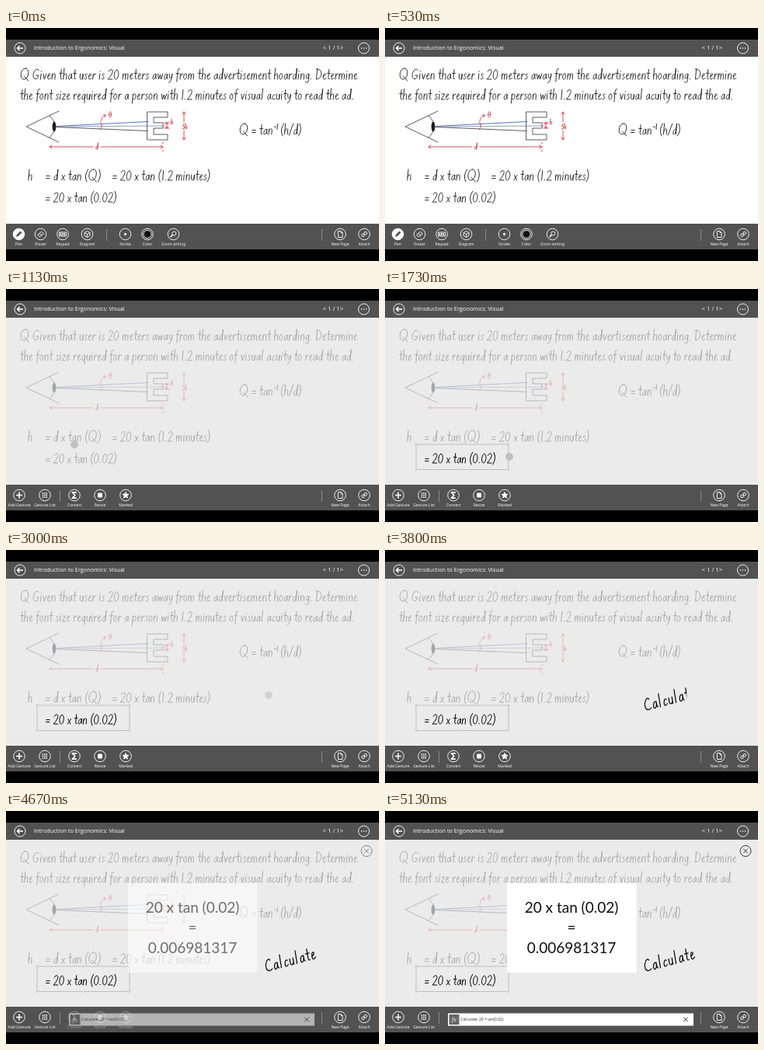
These frames come from a looping animation (480 px wide and 300 px high, 5.27 s). An HTML page:

```html
<!DOCTYPE html>
<html lang="en">
<head>
<meta charset="utf-8">
<title>Ergonomics note</title>
<style>
html, body { margin: 0; width: 100%; height: 100%; overflow: hidden; background: #000; }
svg { display: block; width: 480px; height: 300px; }
text { font-family: "Open Sans", "Noto Sans", sans-serif; fill: #fff; }
path, circle, rect { fill: none; }

.ink path { stroke: #1a1a1a; stroke-width: .9; stroke-linecap: round; stroke-linejoin: round; vector-effect: non-scaling-stroke; }
.ink .red path { stroke: #d8232a; stroke-width: .8; }
.ink .thin { stroke: #333; stroke-width: .8; }
.ink .pupil { fill: #1c1c28; }
.bold path { stroke: #000; stroke-width: 1; }
.calc path { stroke-width: 1.2; }

.ui path, .ui circle { stroke: #fff; stroke-width: .9; stroke-linejoin: round; }
.ui .solid { fill: #fff; }
.ui .dark { fill: #525252; stroke: none; }
.ui .black { fill: #111; }
.ui .thick { stroke-width: 1.6; }
.ui .dots { stroke-width: 1.5; stroke-dasharray: 1.5 .9; }
.ui .line { stroke: #999; stroke-width: .8; }
.ui text { font-size: 5px; text-anchor: middle; }
.head text { font-size: 7.3px; text-anchor: start; }
.close path, .close circle { stroke: #333; stroke-width: 1; }
.panel text { font: 19px Lato, "Open Sans", sans-serif; fill: #111; text-anchor: middle; }

/* every track shares the 5270 ms loop */
.paper, .page, .tools, .gestures, .swap, .select, .touch, .calc, .result { animation: 5270ms infinite both; }
.paper { fill: #fff; animation-name: paper; animation-timing-function: step-end; }
.page { animation-name: page; animation-timing-function: step-end; }
.tools { animation-name: tools; }
.gestures { animation-name: gestures; }
.swap { animation-name: swap; }
.select { animation-name: select; animation-timing-function: step-end; }
.lasso {
  fill: #c0c0c0;
  offset-path: path("M160 216C160 194.7 42 194.7 42 216S160 237.3 160 216");
  offset-rotate: 0deg;
  animation-name: lasso, hold;
  animation-timing-function: linear, step-end;
}
.press { fill: #d2d2d2; animation-name: press; animation-timing-function: step-end; }
.calc { animation-name: calc; }
.result { animation-name: result; }

@keyframes paper { 0% { fill: #fff; } 11.38%, 100% { fill: #ebebeb; } }
@keyframes page { 0% { opacity: 1; } 11.38%, 100% { opacity: .34; } }
@keyframes tools {
  0% { opacity: 1; }
  11.38% { opacity: 1; animation-timing-function: steps(8, start); }
  21.5%, 100% { opacity: 0; }
}
@keyframes gestures {
  0% { opacity: 0; }
  11.38% { opacity: 0; animation-timing-function: steps(8, start); }
  21.5%, 100% { opacity: 1; }
}
@keyframes swap {
  0% { opacity: 1; }
  84.8% { opacity: 1; animation-timing-function: steps(7, start); }
  93.67%, 100% { opacity: 0; }
}
@keyframes lasso {
  0% { offset-distance: 0%; }
  17.65% { offset-distance: 0%; animation-timing-function: steps(10, start); }
  30.36%, 100% { offset-distance: 100%; }
}
@keyframes hold { 0% { opacity: 0; } 11.38% { opacity: 1; } 41.74%, 100% { opacity: 0; } }
@keyframes select { 0% { opacity: 0; } 31.63% { opacity: .6; } 32.8%, 100% { opacity: 1; } }
@keyframes press { 0% { opacity: 0; } 45.54% { opacity: 1; } 63.18%, 100% { opacity: 0; } }
@keyframes calc {
  0% { clip-path: inset(-3px 102% -3px -3px); }
  63.18% { clip-path: inset(-3px 102% -3px -3px); animation-timing-function: steps(10, start); }
  75.9%, 100% { clip-path: inset(-3px -3px -3px -3px); }
}
@keyframes result {
  0% { opacity: 0; }
  84.8% { opacity: 0; animation-timing-function: steps(7, start); }
  93.67%, 100% { opacity: 1; }
}
</style>
</head>
<body>
<svg id="stage" viewBox="0 0 480 300"></svg>
<script>
// Pen strokes per letter: advance, then path with the baseline at y = 0
const pen = {
  a: [5.8, "M4.5-6.5C1-8.5-.3 0 2 0S4.5-6.5 4.5-6.5Q4.2 0 5.6-.6"],
  c: [4.6, "M4-6C1.5-9-.5 0 2 0Q3.4 0 4.2-1.4"],
  d: [6, "M4.5-6C1-8.5-.3 0 2 0S4.5-5 4.7-14V0"],
  e: [5, "M.8-3.6C4-4 4.3-7.3 2.6-7.3S.3 0 2.2 0Q3.6 0 4.8-1.8"],
  f: [4.3, "M4.4-13C2-15 1.8-11 1.8-8V3M0-7.3H4"],
  g: [5.6, "M4.4-6.5C1-8.5-.3-1 2-1S4.4-6.5 4.4-6.5V2C4.4 5 1.5 5 .6 3"],
  h: [5.8, "M.8-14V0M.8-4C2-8.5 4.6-8 4.6-5V0"],
  i: [2.8, "M1-7V0M1.1-10.4v.5"],
  l: [3.4, "M1.2-14L1 0"],
  m: [8.4, "M.7-7V0M.7-4C1.5-8 3.8-8 3.8-5V0M3.8-4C4.6-8 7-8 7-5V0"],
  n: [5.8, "M.8-7V0M.8-4C2-8.3 4.6-8 4.6-5V0"],
  o: [5.4, "M2.4-7.2C-.4-7.2-.3 0 2.2 0S5-7.2 2.4-7.2"],
  p: [5.6, "M.8-7V5M.8-5C2-8.5 5-7.5 4.7-3.5S2 .5.8-1.5"],
  q: [5.6, "M4.4-6.5C1-8.5-.3 0 2 0S4.4-6.5 4.4-6.5V4.5"],
  r: [4.2, "M.8-7V0M.8-4Q1.8-7.6 4-7"],
  s: [4.2, "M3.6-6.4C2-8.4-.2-5.6 2-4S3.4 1 .4-.6"],
  t: [4.2, "M2-12.5V-1.5Q2.2.3 3.8-.6M0-7.6H4"],
  u: [5.6, "M.8-7V-3C.8.8 3.6.8 4.4-3V-7V0"],
  v: [5, "M.5-7L2.3 0 4.4-7"],
  w: [7.4, "M.5-7L2 0 3.6-6 5.2 0 6.8-7"],
  x: [5, "M.5-6.5L4.2 0M4.2-6.5L.4 0"],
  y: [5.2, "M.6-7Q.8-1.5 2.6-1.5T4.4-7Q4.4 4 1 4.5"],
  z: [5, "M.5-7H4.2L.4 0H4.4"],
  C: [7.5, "M6-11C4-15 0-9 .6-4S5 0 7-1.5"],
  D: [8, "M1.2-13V0C9.5-1 8.5-14 0-13"],
  G: [8.6, "M7-11.5C4-16-.5-9 .6-4S6.6 1 7-5H4.2"],
  Q: [12, "M6-14C-1-14-1 0 5 0S12-14 6-14M5-4L11 2"],
  0: [7, "M3.2-12C-.6-12-.5 0 3 0S7-12 3.2-12"],
  1: [3.6, "M1.6-12.5V0"],
  2: [6.8, "M.5-10C2-14 6.5-13 5-8Q3.5-3.5.3 0H6"],
  ".": [3, "M.8-.4h.5"],
  "(": [4, "M3.4-14Q-1.5-6 3 2"],
  ")": [4, "M.4-14Q5-6 .4 2"],
  "/": [5, "M.3 1L4.6-14"],
  "=": [6, "M.4-5.5H4.8M.4-2.5H4.8"],
  "-": [5, "M0-6H4"],
  "θ": [6, "M3-12C-.5-12-.5 0 3 0S6.5-12 3-12M.5-6H5.5"],
  "5": [6, "M5-12H1.4L1-7C7-9 6 2 .4-.6"],
  " ": [2.8, ""]
};

function write(text, x, y, size = 1, track = .6, turn = 0) {
  let at = 0;
  const strokes = [...text].map(ch => {
    const [step, d] = pen[ch];
    const mark = d && `<path transform="translate(${at.toFixed(2)})" d="${d}"/>`;
    at += step + track;
    return mark;
  }).join("");
  return `<g role="img" aria-label="${text}" transform="translate(${x} ${y}) rotate(${turn}) scale(${size}) skewX(-5)">${strokes}</g>`;
}

const path = (d, cls = "") => `<path class="${cls}" d="${d}"/>`;
const dot = (x, y, r, cls = "") => `<circle class="${cls}" cx="${x}" cy="${y}" r="${r}"/>`;
const box = (x, y, w, h, fill, more = "") =>
  `<rect x="${x}" y="${y}" width="${w}" height="${h}" style="fill:${fill}" ${more}/>`;
const tool = (x, label, icon, cls = "") =>
  `<g transform="translate(${x} 265.5)">${dot(0, 0, 7.3, cls)}${icon}<text y="14.3">${label}</text></g>`;
const cross = (x, y, r) => path(`M${x - r} ${y - r}l${2 * r} ${2 * r}m0 ${-2 * r}l${-2 * r} ${2 * r}`);

const working = write("= 20 x tan (0.02)", 51, 224, .98);

const diagram = `
  ${path("M68 107L26 127L68 147M56 113Q71 127 56 141", "thin")}
  <ellipse class="pupil" cx="62" cy="127" rx="2.4" ry="6.5"/>
  <path d="M65 126.5L183 120.5" style="stroke:#3f62c4"/>
  <path d="M65 127L204 126" style="stroke:#8a94b0"/>
  ${path("M65 127.5L182 132.5", "thin")}
  ${path("M182 108H208V115H190V122H202V129H190V137H208V144H182Z", "thin")}
  <g class="red">
    ${path("M112 153H56M59 151L56 153L59 155M122 153H202M199 151L202 153L199 155M202 147v2m0 8v2")}
    ${path("M121 121Q126 126 121 131M122 120Q122 115 128 112M125.5 112L128 112L127 115")}
    ${path("M207 122V129M205.5 124L207 122L208.5 124M205.5 127L207 129L208.5 127M204 122h6M204 129h6")}
    ${path("M229 121V108M227 111L229 108L231 111M229 132V144M227 141L229 144L231 141")}
    ${write("d", 115, 156, .6)}${write("θ", 132, 115, .6)}
    ${write("h", 212, 124, .5)}${write("5h", 227, 130, .5)}
  </g>`;

const page = `<g class="page ink">
  ${write("Q Given that user is 20 meters away from the advertisement hoarding. Determine", 18, 66, 1.01)}
  ${write("the font size required for a person with 1.2 minutes of visual acuity to read the ad.", 18, 92)}
  ${diagram}
  ${write("Q = tan", 300, 137)}${write("-1", 345, 130.5, .55)}${write("(h/d)", 353, 137)}
  ${write("h", 28, 196)}${write("= d x tan (Q)", 51, 196)}
  ${write("= 20 x tan (1.2 minutes)", 137, 196)}
  ${working}
</g>`;

const handles = [40, 99.5, 159].flatMap(x => [200, 232.5].map(y => [x, y]))
  .map(([x, y]) => `<circle cx="${x}" cy="${y}" r="1.2" style="fill:#f2f2f2;stroke:#aaa;stroke-width:.5"/>`).join("");
const selection = `<g class="select">
  ${box(40, 200, 119, 32.5, "#ebebeb", 'stroke="#aaa" stroke-width=".7"')}
  ${handles}<g class="ink bold">${working}</g>
</g>`;

const header = `<g class="ui head">
  ${box(0, 15, 480, 22, "#525252")}
  ${dot(18, 26, 7)}${path("M22 26H14.5M17.5 23L14.5 26L17.5 29", "thick")}
  <text x="36" y="28.4">Introduction to Ergonomics: Visual</text>
  <text x="407.5" y="28.4" style="font-size:7.8px">&lt; 1 / 1&gt;</text>
  ${dot(460.5, 26, 7)}${[457.5, 460.5, 463.5].map(x => dot(x, 26, .4, "solid")).join("")}
</g>`;

const grid = path("M-3.3-2.6h7M-3.3 0h7M-3.3 2.6h7", "dots");
const toolbar = `<g class="ui">
  ${box(0, 252, 480, 33, "#525252")}
  <g class="tools">
    ${tool(16.5, "Pen", path("M-3.5 3.5L-2.6.6L2-4L4-2L-.6 2.6Z", "dark"), "solid")}
    ${tool(44.5, "Eraser", path("M-4 1L1-3.2L4-.6L-1 3.4ZM-1.5-1L1.5 1.5"))}
    ${tool(73, "Keypad", path("M-4.5-2.5h9v5h-9z") + path("M-3.3-.8h7M-3.3 1h7", "dots"))}
    ${tool(104.5, "Diagram", path("M0-4L3.5-2V2L0 4L-3.5 2V-2ZM-3.5-2L0 0L3.5-2M0 0V4"))}
    ${path("M129.5 259V274", "line")}
    ${tool(153.5, "Stroke", dot(0, 0, 1.2, "solid"))}
    ${tool(182, "Color", dot(0, 0, 5, "black"))}
    ${tool(215.5, "Zoom writing", dot(.8, -1, 2.5) + path("M-1 .8L-3.7 3.7", "thick"))}
  </g>
  <g class="gestures">
    ${tool(17, "Add Gesture", path("M-4 0H4M0-4V4", "thick"))}
    ${tool(50, "Gesture List", grid)}
    ${path("M69.5 259V274", "line")}
    <g class="swap">
      ${tool(88, "Convert", path("M2.8-3.6H-2.6L.8 0L-2.6 3.6H2.8", "thick"))}
      ${tool(121, "Resize", path("M-2.5-2.5h5v5h-5z", "solid"))}
      ${tool(154, "Marked", path("M0-4L1.2-1.3L4-1.2L1.8.7L2.5 3.5L0 2L-2.5 3.5L-1.8.7L-4-1.2L-1.2-1.3Z", "solid"))}
    </g>
  </g>
  ${path("M406.5 259V274", "line")}
  ${tool(430, "New Page", path("M-2.6-4H1L3-2V4H-2.6ZM1-4V-2H3"))}
  ${tool(461, "Attach", dot(-1.6, 1.3, 1.8) + dot(1.7, -1.4, 1.8) + path("M-.6.5L.6-.6"))}
</g>`;

const result = `<g class="result">
  <g class="panel">
    ${box(157, 93, 166.5, 115, "#fff")}
    <text x="240" y="131">20 x tan (0.02)</text>
    <text x="240" y="157">=</text>
    <text x="240" y="183">0.006981317</text>
  </g>
  <g class="close">
    ${dot(464, 51.5, 7)}${cross(464, 51.5, 2.8)}
    ${box(81, 260.5, 316, 16, "#fff")}
    ${box(82.5, 262, 13, 13, "#666")}
    <text x="89" y="271" text-anchor="middle" style="font:italic 8px 'Liberation Serif',serif">fx</text>
    <text x="97" y="270.2" style="font-size:5px;fill:#222">Calculate: 20 * tan(0.02)</text>
    ${cross(387, 268.5, 2.8)}
  </g>
</g>`;

document.getElementById("stage").innerHTML = `
  <rect class="paper" y="37" width="480" height="215"/>
  ${page}${selection}
  <circle class="touch lasso" r="5"/>
  <circle class="touch press" cx="338" cy="187" r="5"/>
  <g class="calc ink bold">${write("Calculate", 335, 207, 1.2, 1.25, -15)}</g>
  ${header}${toolbar}${result}`;
</script>
</body>
</html>
```
